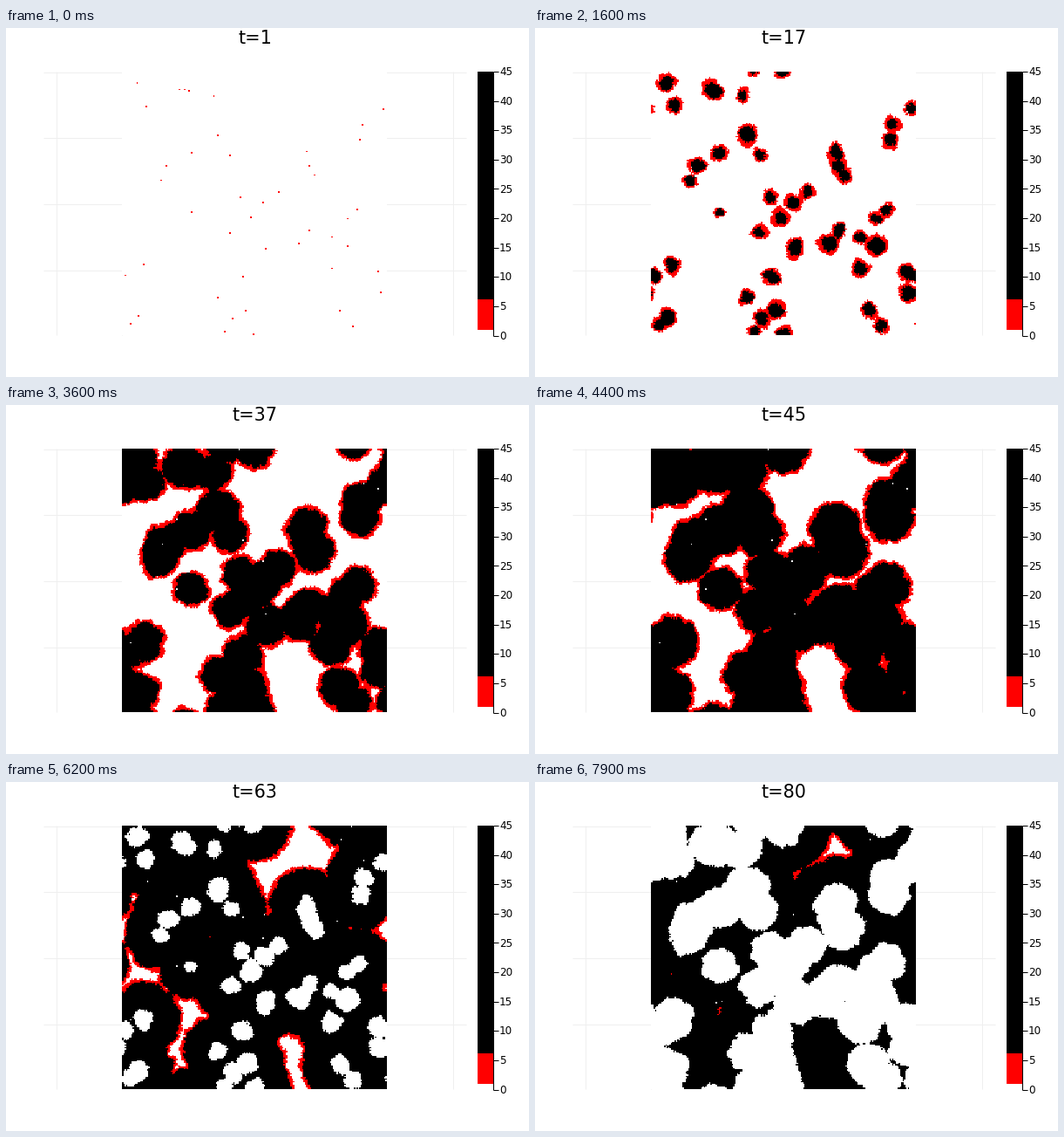
A matplotlib script for the animation above (8 s loop, 600 px wide and 400 px high).

```python
import numpy as np
import matplotlib.pyplot as plt
from matplotlib.animation import FuncAnimation
from matplotlib.colors import ListedColormap
from matplotlib.patches import Rectangle

N, STEPS = 200, 80
ILL, CYCLE = 5, 45            # infectious steps, steps until susceptible again
LEFT, RIGHT, TOP, BOTTOM = 133, 437, 50, 352
W, H = RIGHT - LEFT, BOTTOM - TOP
SPEED = 0.75                  # front speed, px per step

# first cases, grouped by how far the colony reaches in 16 steps (px)
WEAK, MID, STRONG = 9.2, 11, 13
COLONIES = {
    WEAK: [(199, 70), (210, 71), (160, 89), (238, 77), (257, 146), (177, 174),
           (269, 194), (312, 187), (257, 234), (348, 232), (374, 239),
           (391, 218), (402, 207), (432, 92), (136, 283), (243, 308),
           (250, 348), (142, 338), (398, 341)],
    MID: [(150, 63), (212, 143), (184, 158), (295, 200), (373, 275),
          (344, 141), (348, 158), (354, 168), (408, 111), (406, 127),
          (157, 271), (427, 279), (429, 303), (272, 285), (260, 332),
          (284, 351), (151, 329), (382, 323)],
    STRONG: [(204, 70), (243, 122), (298, 252), (391, 250), (335, 246),
             (281, 217), (275, 323)],
    7: [(212, 210)],
}


def cell(x, y):
    return int((y + 0.5 - TOP) * N / H), int((x + 0.5 - LEFT) * N / W)


def smooth_noise(rng, sigma):
    f = np.fft.fftfreq(N)
    k = np.exp(-2 * (np.pi * sigma) ** 2 * (f[:, None] ** 2 + f ** 2))
    n = np.fft.ifft2(np.fft.fft2(rng.normal(size=(N, N))) * k).real
    return n / n.std()


def wrapped(d, size):
    d = np.abs(d)
    return np.minimum(d, size - d)


def infection_times():
    rng = np.random.default_rng(7)
    rough = 1.3 * smooth_noise(rng, 2)
    grain = 0.85 * rng.normal(size=(N, N))
    xs = LEFT + (np.arange(N) + 0.5) * W / N
    ys = TOP + (np.arange(N) + 0.5) * H / N
    first = np.full((N, N), np.inf)
    cases = [(x, y, r) for r, spots in COLONIES.items() for x, y in spots]
    for x, y, r in cases:
        d = np.hypot(wrapped(xs - x - 0.5, W)[None, :],
                     wrapped(ys - y - 0.5, H)[:, None])
        d = d + rough * np.minimum(1, d / 7) + grain
        t = np.where(d < r, 1 + 16 * d / r, 17 + (d - r) / SPEED)
        first = np.minimum(first, t)
    first = np.maximum(np.ceil(first), 2)
    seeds = tuple(np.array([cell(x, y) for x, y, _ in cases]).T)
    first[seeds] = 1
    # a cell can only catch it from a neighbour that is already ill
    for _ in range(12):
        near = np.min([np.roll(first, s, a) for s in (1, -1) for a in (0, 1)],
                      axis=0)
        first = np.maximum(first, near + 1)
        first[seeds] = 1
    # a few cells are never infected
    spared = rng.random((N, N)) < 0.0004
    spared[seeds] = False
    first[spared] = np.inf
    return first


first = infection_times()


def classes(t):
    age = t - first + 1
    out = np.zeros((N, N))
    out[(age >= 1) & (age <= ILL)] = 1
    out[(age > ILL) & (age <= CYCLE)] = 2
    return out


plt.rcParams["font.family"] = "DejaVu Sans"
PX = 0.72                     # points per pixel
fig = plt.figure(figsize=(6, 4), dpi=100, facecolor="white")
ax = fig.add_axes([0, 0, 1, 1])


def line(xs, ys, color):
    ax.plot(xs, ys, color=color, lw=PX, solid_capstyle="butt", zorder=1)


for k in range(4):
    y = 50.5 + 75.7 * k
    line([43, 528], [y, y], "#efefef")
for x in (57.5, LEFT, 512.5):
    line([x, x], [TOP, BOTTOM], "#efefef")

grid = ax.imshow(classes(1), cmap=ListedColormap(["white", "red", "black"]),
                 vmin=0, vmax=2, extent=(LEFT, RIGHT, BOTTOM, TOP),
                 interpolation="nearest", aspect="auto", zorder=2)

# colour bar
ax.add_patch(Rectangle((540.5, TOP), 18, 261, fc="black", lw=0))
ax.add_patch(Rectangle((540.5, 311), 18, 34.5, fc="red", lw=0))
line([558.5, 558.5], [TOP, 353], "black")
for v in range(0, 46, 5):
    y = 352.5 - v * 302.5 / 45
    line([558.5, 564.5], [y, y], "black")
    ax.text(566, y + 4.2, str(v), fontsize=12 * PX, va="baseline")

title = ax.text(285.7, 18, "t=1", fontsize=20.8 * PX, ha="center",
                va="baseline")
ax.set_xlim(0, 600)
ax.set_ylim(400, 0)
ax.axis("off")


def update(i):
    grid.set_data(classes(i + 1))
    title.set_text(f"t={i + 1}")
    return grid, title


anim = FuncAnimation(fig, update, frames=STEPS, interval=100, repeat=True,
                     repeat_delay=0, blit=False)
plt.show()
```
